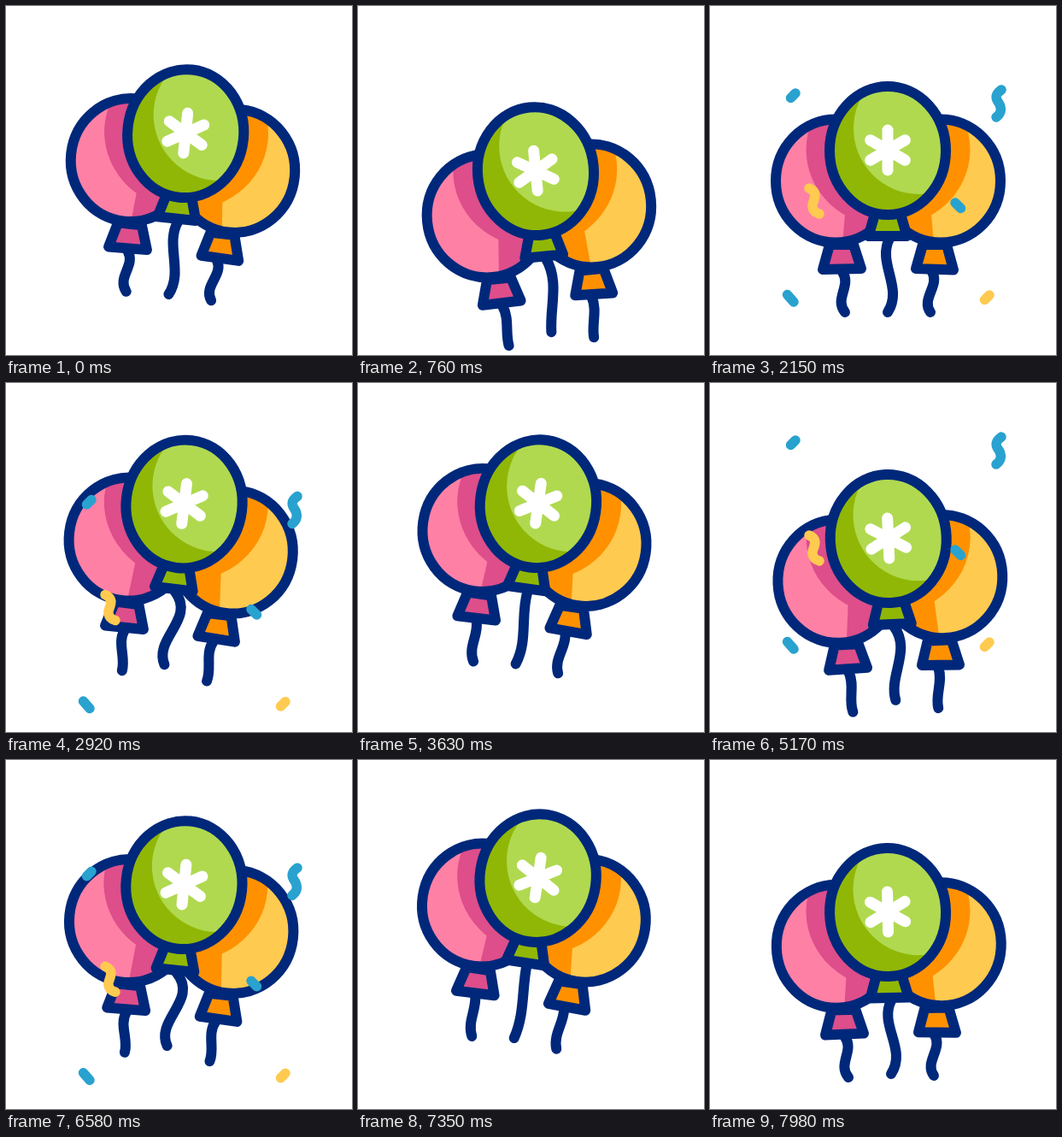
An HTML page for the animation above (8000 ms loop, 405 by 408 pixels).

```html
<!DOCTYPE html>
<html lang="en">
<head>
<meta charset="utf-8">
<title>Balloons</title>
<style>
  html, body { margin: 0; width: 100%; height: 100%; overflow: hidden; background: #fff; }
  svg { display: block; width: 100%; height: 100%; }
  .line { fill: none; stroke: #00287a; stroke-width: 12; stroke-linecap: round; stroke-linejoin: round; }
  .knot { stroke: #00287a; stroke-width: 12; stroke-linejoin: round; }
  .star { stroke: #fff; stroke-width: 13; stroke-linecap: round; }
  #confetti { fill: none; stroke-width: 11.5; stroke-linecap: round; }
  .blue { stroke: #29a2cf; }
  .yellow { stroke: #ffca50; }
</style>
</head>
<body>
<svg viewBox="0 0 405 408">
  <defs>
    <clipPath id="clipLeft"><ellipse cx="147" cy="204.5" rx="70" ry="72"/></clipPath>
    <clipPath id="clipRight"><ellipse cx="270" cy="204.5" rx="70" ry="72"/></clipPath>
    <clipPath id="clipMiddle"><ellipse cx="208" cy="169" rx="68" ry="75"/></clipPath>
    <g id="shade">
      <ellipse cx="208.5" cy="168" rx="96" ry="90"/>
      <path d="M158 243L154 290H263L259 243Z"/>
    </g>
  </defs>

  <g id="sides">
    <path id="stringLeft" class="line"/>
    <path class="knot" fill="#dd4e8a" d="M140 279L132 308L177 307L168 279Z"/>
    <g clip-path="url(#clipLeft)">
      <rect x="70" y="125" width="155" height="160" fill="#ff80a5"/>
      <use class="shade" href="#shade" fill="#dd4e8a"/>
    </g>
    <ellipse class="line" cx="147" cy="204.5" rx="70" ry="72"/>

    <path id="stringRight" class="line"/>
    <path class="knot" fill="#ff9100" d="M249 279L241 307L285 308.5L277 279Z"/>
    <g clip-path="url(#clipRight)">
      <rect x="195" y="125" width="155" height="160" fill="#ffca50"/>
      <use class="shade" href="#shade" fill="#ff9100"/>
    </g>
    <ellipse class="line" cx="270" cy="204.5" rx="70" ry="72"/>
  </g>

  <g id="middle">
    <path id="stringMiddle" class="line"/>
    <path class="knot" fill="#90b705" d="M193 243L185.500 269H230.500L223 243Z"/>
    <g clip-path="url(#clipMiddle)">
      <rect x="135" y="90" width="150" height="160" fill="#90b705"/>
      <circle cx="245" cy="143" r="77" fill="#b0d950"/>
    </g>
    <ellipse class="line" cx="208" cy="169" rx="68" ry="75"/>
    <g class="star" transform="translate(208 168.500)">
      <path id="arm" d="M0-23.500V23.500"/>
      <use href="#arm" transform="rotate(60)"/>
      <use href="#arm" transform="rotate(-60)"/>
    </g>
  </g>

  <g id="confetti">
    <path class="blue" d="M94.500 107.500L100 102M287 230L293.500 236.500M90.500 337.500L98 346M341 98C330 106 337 111 339 115C342 122 340 126 335 130"/>
    <path class="yellow" d="M321.500 343.500L327 338M116 213C130 219 118 230 120 235C121 241 125 242 128 243"/>
  </g>
</svg>
<script>
const LOOP = 8000, PERIOD = 3800;
const PIVOT = '208 190';

// time, tilt, sway, middle lift, side lift, middle string bends, side string bends
const poses = [
  [0,     6,    0,   -20, -18,  -12, 14,   10, -12],
  [380,  -1.2,  0.5,   9,  12,  -15, 19,   10, -12],
  [760,  -5.6,  2,    24,  35,   14,  0,    6,  -2],
  [920,  -5.8,  2,    26,  38,   18, -3,    6,  -2],
  [1370, -2.6,  1.7,  13,  24.5, 20, -8,    6,  -4],
  [2150,  0,    0,     0,   0,  -14, 18,   10, -12],
  [2780,  6,   -1.8, -23, -10,   30, -18,  -8,   4],
  [3320,  9,   -2,   -37, -28,    8,  0,    0,  -4],
  [3630,  8,    0,   -28, -24,   -4, 10,    4,  -8]
];

const $ = id => document.getElementById(id);
const shades = document.querySelectorAll('.shade');

function poseAt(index) {
  const n = poses.length;
  const pose = poses[(index + n) % n];
  return { time: pose[0] + PERIOD * Math.floor(index / n), values: pose.slice(1) };
}

// Periodic cubic Hermite interpolation with slopes taken from the neighbours.
function sample(time) {
  let i = poses.length - 1;
  while (poses[i][0] > time) i--;
  const [a, b, c, d] = [-1, 0, 1, 2].map(k => poseAt(i + k));
  const span = c.time - b.time;
  const u = (time - b.time) / span;
  return b.values.map((from, k) => {
    const to = c.values[k];
    const slopeIn = (to - a.values[k]) / (c.time - a.time) * span;
    const slopeOut = (d.values[k] - from) / (d.time - b.time) * span;
    const delta = to - from;
    return from + u * (slopeIn + u * (3 * delta - 2 * slopeIn - slopeOut
      + u * (slopeIn + slopeOut - 2 * delta)));
  });
}

function drawString(id, x0, y0, x1, y1, bend0, bend1) {
  const dx = (x1 - x0) / 3, dy = (y1 - y0) / 3;
  $(id).setAttribute('d', `M${x0} ${y0}C${x0 + dx + bend0} ${y0 + dy} ${x1 - dx + bend1} ${y1 - dy} ${x1} ${y1}`);
}

function place(id, x, y, angle) {
  $(id).setAttribute('transform', `translate(${x} ${y}) rotate(${angle} ${PIVOT})`);
}

function render(now) {
  const time = now % LOOP % PERIOD;
  const [tilt, sway, lift, sideLift, m0, m1, s0, s1] = sample(time);

  place('middle', sway, lift, tilt);
  place('sides', sway, sideLift, tilt);
  shades.forEach(shade => shade.setAttribute('transform', `translate(0 ${lift - sideLift})`));

  drawString('stringMiddle', 210, 272, 208, 358, m0, m1);
  drawString('stringLeft', 155, 311, 158, 358, s0, s1);
  drawString('stringRight', 260, 311, 258, 358, s0, s1);

  const fade = Math.min((time - 830) / 70, (3330 - time) / 70);
  $('confetti').setAttribute('opacity', Math.max(0, Math.min(1, fade)));
  $('confetti').setAttribute('transform', `translate(0 ${(time - 2150) * 0.0448})`);
}

let start;
function tick(now) {
  start ??= now;
  render(now - start);
  requestAnimationFrame(tick);
}
render(0);
requestAnimationFrame(tick);
</script>
</body>
</html>
```
